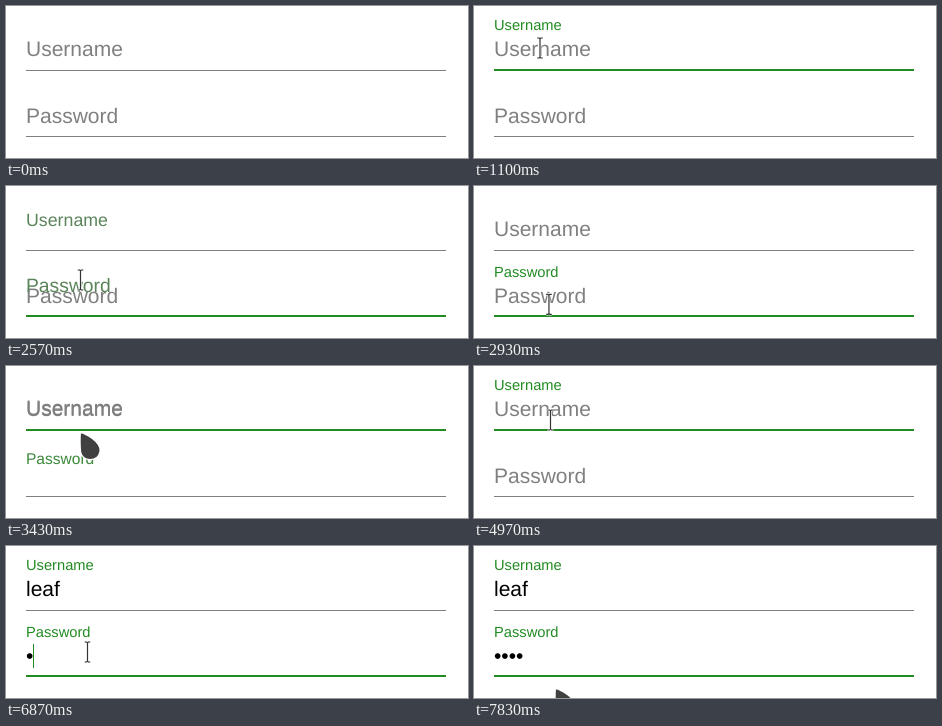
These frames come from a looping animation (462 px wide and 152 px high, 8 s). An HTML page:

```html
<!DOCTYPE html>
<html lang="en">
<head>
<meta charset="utf-8">
<title>Floating labels</title>
<style>
  html, body { margin: 0; width: 100%; height: 100%; overflow: hidden; background: #fff; }
  svg { display: block; width: 462px; height: 152px; }
  text { font: 21px "Liberation Sans", Arial, sans-serif; fill: gray; text-rendering: geometricPrecision; }
  .value { fill: #000; }
  rect { shape-rendering: crispEdges; }
  .caret { fill: forestgreen; }
  #beam path { fill: none; stroke: #fff; stroke-width: 2.5; }
  #beam path + path { stroke: #333; stroke-width: 1.2; }
  #drop { fill: #404040; stroke: #fff; stroke-width: 2.4; paint-order: stroke; }
</style>
</head>
<body>
<svg viewBox="0 0 462 152">
  <g id="fields"></g>
  <g id="cursor">
    <g id="beam"></g>
    <path id="drop" d="M0 .5Q2 0 11 6Q19 12 18.5 18Q17 26 9 26Q2 26 .2 19Q-.7 8 0 .5Z"/>
  </g>
</svg>
<script>
const LOOP = 8000, MOVE = 400, LAG = 25, BLINK = 540;
const $ = id => document.getElementById(id);

const bar = "M-2.8-10h2L0-9 .8-10h2M0-9V9M-2.8 10h2L0 9 .8 10h2";
$("beam").innerHTML = `<path d="${bar}"/><path d="${bar}"/>`;

// Typing starts at "type", one character every "gap" ms
const fields = [
  { name: "Username", text: "leaf", base: 50, line: 63, focus: 4400, blur: 6400, type: 5200, gap: 157 },
  { name: "Password", text: "••••", base: 117, line: 129, focus: 6400, blur: LOOP, type: 6870, gap: 120 }
];

// Turning points of the pointer: time, x, y
const path = [
  [200, -8, 91], [1000, 66, 42], [1270, 66, 42], [1420, 71, 92], [1660, 74.5, 45],
  [2290, 74.5, 45], [2570, 74.5, 94], [2970, 75, 121], [3430, 75, 67], [3930, 76.5, 54],
  [5510, 76.5, 54], [6000, 80.5, 100], [6130, 81.5, 106], [7470, 81.5, 106], [7830, 82, 143]
];

const mix = (a, b, p) => a + (b - a) * p;

function pointer(t) {
  const i = path.findIndex(k => k[0] > t);
  if (i < 1) return path.at(i).slice(1);
  const [t0, x0, y0] = path[i - 1], [t1, x1, y1] = path[i];
  const p = (t - t0) / (t1 - t0);
  return [mix(x0, x1, p), mix(y0, y1, p)];
}

// Is the point on the field, from "above" its line to "below" it?
const over = (f, [x, y], above, below) => x > 20 && y > f.line - above && y < f.line + below;
const focused = (f, t) => t >= f.focus && t < f.blur;
const active = (f, t) => focused(f, t) || over(f, pointer(t), 53, 6);
const isUp = (f, t) => t >= f.type || active(f, t);

// The CSS "ease" curve
function ease(x) {
  if (x <= 0) return 0;
  if (x >= 1) return 1;
  const curve = (a, b, s) => 3 * a * s * (1 - s) ** 2 + 3 * b * s * s * (1 - s) + s ** 3;
  let lo = 0, hi = 1;
  for (let i = 0; i < 20; i++) {
    const mid = (lo + hi) / 2;
    if (curve(.25, .25, mid) < x) lo = mid; else hi = mid;
  }
  return curve(.1, 1, lo);
}

// Times at which the label starts to rise or fall
function findToggles(f) {
  const list = [];
  for (let t = 0; t < LOOP; t += 5)
    if (isUp(f, t) !== (list.length % 2 === 1)) list.push(t);
  return list;
}

// Label position: 0 resting, 1 raised; an interrupted move turns back early
function raised(f, t) {
  let goal = 0, from = 0, start = 0;
  const at = time => {
    const span = MOVE * Math.abs(goal - from);
    return span ? mix(from, goal, ease((time - start) / span)) : goal;
  };
  for (const time of f.toggles) {
    if (time > t) break;
    from = at(time);
    goal = 1 - goal;
    start = time;
  }
  return at(t);
}

function set(el, attrs) {
  for (const k in attrs) el.setAttribute(k, attrs[k]);
}

function add(tag, attrs, text = "") {
  const el = document.createElementNS("http://www.w3.org/2000/svg", tag);
  set(el, attrs);
  el.textContent = text;
  return $("fields").appendChild(el);
}

const show = (el, on) => el.style.display = on ? "" : "none";

for (const f of fields) {
  f.toggles = findToggles(f);
  f.hint = add("text", { x: 20, y: f.base }, f.name);
  f.value = add("text", { x: 20, y: f.base, class: "value" });
  f.label = add("text", { x: 20 }, f.name);
  f.rule = add("rect", { x: 20, width: 420 });
  f.caret = add("rect", { y: f.line - 31, width: 1, height: 24, class: "caret" });
}

function drawField(f, t) {
  const on = active(f, t) ? 1 : 0;
  const count = Math.max(0, Math.min(f.text.length, Math.floor((t - f.type) / f.gap) + 1));
  const typed = f.text.slice(0, count);
  const p = raised(f, t), size = mix(21, 14.7, raised(f, t - LAG));

  if (f.value.textContent !== typed) f.value.textContent = typed;
  show(f.hint, on && !count);
  set(f.label, { y: mix(f.base, f.base - 26, p) });
  f.label.style.fontSize = size + "px";
  f.label.style.fill = `rgb(${mix(128, 34, p)},${mix(128, 139, p)},${mix(128, 34, p)})`;
  set(f.rule, { y: f.line + 1 - on, height: 1 + on, fill: on ? "forestgreen" : "gray" });

  const last = count ? f.type + (count - 1) * f.gap : f.focus;
  const lit = focused(f, t) && Math.floor((t - last) / BLINK) % 2 === 0;
  show(f.caret, lit);
  if (lit) set(f.caret, { x: 20 + Math.round(count && f.value.getComputedTextLength()) });
}

function drawCursor(t) {
  const at = pointer(t);
  const overInput = fields.some(f => over(f, at, 42, 2));
  show($("cursor"), t >= path[0][0]);
  set($("cursor"), { transform: `translate(${at})` });
  show($("beam"), overInput);
  show($("drop"), !overInput);
}

let begin;
function frame(now) {
  begin ??= now;
  const t = (now - begin) % LOOP;
  fields.forEach(f => drawField(f, t));
  drawCursor(t);
  requestAnimationFrame(frame);
}
requestAnimationFrame(frame);
</script>
</body>
</html>
```
